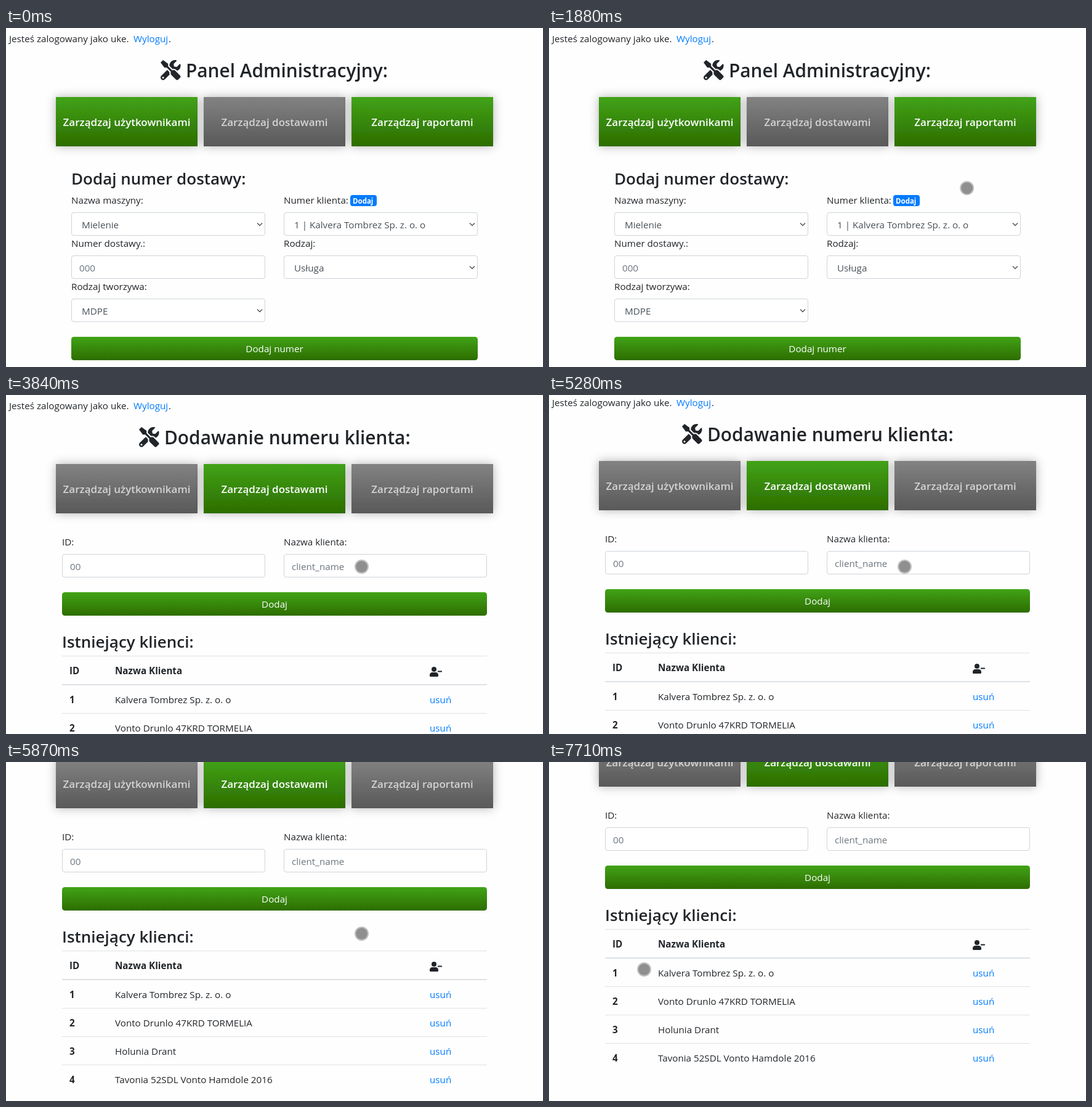
An HTML page that plays this animation: 872 px wide and 550 px high, repeating every 8 s.

```html
<!DOCTYPE html>
<html lang="pl">
<head>
<meta charset="utf-8">
<title>Panel</title>
<style>
  html, body { margin: 0; width: 100%; height: 100%; overflow: hidden; background: #fefefe; }
  svg { display: block; width: 100%; height: 100%; }
  text { font-family: "Open Sans", "Noto Sans", sans-serif; font-size: 15.2px; fill: #212529; }
  .h1 { font-size: 29.8px; font-weight: 600; }
  .h2 { font-size: 26px; font-weight: 600; }
  .nav { font-size: 17px; font-weight: 600; text-anchor: middle; }
  .mid { text-anchor: middle; }
  .bold { font-weight: 700; }
  .badge { font-size: 11.5px; font-weight: 700; }
  .white { fill: #fff; }
  .pale { fill: #d4d4d4; }
  .value { fill: #495057; }
  .hint { fill: #6c757d; }
  .link { fill: #007bff; }
  .field { fill: #fff; stroke: #ced4da; }
  .chevron { fill: none; stroke: #555; stroke-width: 1.5; }
</style>
</head>
<body>
<svg viewBox="0 0 872 550">
  <defs>
    <linearGradient id="green" x2="0" y2="1"><stop stop-color="#41a317"/><stop offset="1" stop-color="#2d6d00"/></linearGradient>
    <linearGradient id="gray" x2="0" y2="1"><stop stop-color="#828282"/><stop offset="1" stop-color="#595959"/></linearGradient>
    <filter id="shadow" x="-20%" y="-50%" width="140%" height="200%">
      <feDropShadow dx="0" dy="0" stdDeviation="8" flood-opacity=".3"/>
    </filter>
    <path id="tools" fill="#212529" fill-rule="evenodd" d="M501 396L384 279C361 256 326 251 299 265L192 158V96L64 0 0 64l96 128h62l107 107c-14 28-9 62 14 85l117 117c14 15 38 15 53 0l52-52c15-15 15-39 0-53zM332 225c28 0 55 11 75 31l19 19c16-7 31-16 44-29 37-37 50-89 38-137-2-9-14-12-20-5l-75 74-68-11-11-68 74-75c7-6 4-17-5-20-48-11-100 1-137 38-28 29-42 66-41 104l82 82zM228 307l-57-57L19 403c-25 25-25 65 0 90s65 25 90 0l124-123c-8-20-10-42-5-63zM64 472a24 24 0 1 1 0-48 24 24 0 0 1 0 48z"/>
  </defs>
  <g id="deliveries"></g>
  <g id="clients"></g>
  <rect id="scrollbar" x="865" y="4" width="3" height="419" rx="1.5" fill="#808080"/>
  <g id="touch">
    <circle r="9.5" fill="#202020" fill-opacity=".5"/>
    <circle r="10.5" fill="none" stroke="#505050" stroke-opacity=".35" stroke-width="2"/>
  </g>
  <path id="arrow" d="M578.5 279.5v15.5l3.6-3.4 2.4 5.6 2.3-1-2.4-5.5h5z" fill="#fff" stroke="#000"/>
</svg>
<script>
const $ = id => document.getElementById(id);
const text = (x, y, s, cls = '') => `<text x="${x}" y="${y}" class="${cls}">${s}</text>`;
const rect = (x, y, w, h, attrs) => `<rect x="${x}" y="${y}" width="${w}" height="${h}" ${attrs}/>`;
const field = (x, y, w) => rect(x + .5, y + .5, w - 1, 37, 'rx="3.5" class="field"');
const input = (x, y, w, hint) => field(x, y, w) + text(x + 13, y + 26, hint, 'hint');
const chevron = (x, y) => `<path class="chevron" d="M${x - 4} ${y - 2}l4 4 4-4"/>`;
const select = (x, y, value) =>
  field(x, y, 315) + text(x + 17, y + 26, value, 'value') + chevron(x + 306, y + 19.5);
const button = (x, y, w, label) =>
  rect(x, y, w, 38, 'rx="4.5" fill="url(#green)"') + text(436, y + 25, label, 'mid white');
const line = (y, h = 1) => rect(91, y, 690, h, 'fill="#dee2e6"');

function header(title, iconX, activeColor, otherColor) {
  const labels = ['użytkownikami', 'dostawami', 'raportami'];
  const color = i => i === 1 ? activeColor : otherColor;
  const boxes = labels.map((_, i) =>
    rect(81 + 240 * i, 112, 230, 80, `fill="url(#${color(i)})" filter="url(#shadow)"`));
  const names = labels.map((s, i) =>
    text(196 + 240 * i, 159, 'Zarządzaj ' + s, 'nav ' + (color(i) === 'green' ? 'white' : 'pale')));
  return text(5, 23, 'Jesteś zalogowany jako uke.') + text(207, 23, 'Wyloguj', 'link') + text(264, 23, '.') +
    `<use href="#tools" transform="translate(${iconX} 52) scale(.0635)"/>` +
    text(iconX + 41, 80, title, 'h1') + boxes.join('') + names.join('');
}

const firstClient = 'Kalvera Tombrez Sp. z. o. o';
const clients = [firstClient, 'Vonto Drunlo 47KRD TORMELIA', 'Holunia Drant', 'Tavonia 52SDL Vonto Hamdole 2016'];

$('deliveries').innerHTML = header('Panel Administracyjny:', 251, 'gray', 'green') +
  text(106, 254, 'Dodaj numer dostawy:', 'h2') +
  text(106, 285, 'Nazwa maszyny:') + select(106, 299, 'Mielenie') +
  text(451, 285, 'Numer klienta:') + rect(559, 271, 43, 18, 'rx="4" class="link"') +
  text(563, 285, 'Dodaj', 'badge white') + select(451, 299, '1 | ' + firstClient) +
  text(106, 355, 'Numer dostawy.:') + input(106, 369, 315, '000') +
  text(451, 355, 'Rodzaj:') + select(451, 369, 'Usługa') +
  text(106, 425, 'Rodzaj tworzywa:') + select(106, 439, 'MDPE') +
  button(106, 501, 660, 'Dodaj numer') +
  `<g id="hover">${rect(748, 300, 17.5, 36.5, 'fill="#dcdcdc"')}
   <path class="chevron" style="stroke:#111;stroke-width:2" d="M753 316.5l4 4 4-4"/></g>`;

$('clients').innerHTML = header('Dodawanie numeru klienta:', 216, 'green', 'gray') +
  text(91, 244, 'ID:') + input(91, 258, 330, '00') +
  text(451, 244, 'Nazwa klienta:') + input(451, 258, 330, 'client_name') +
  button(91, 320, 690, 'Dodaj') +
  text(91, 410, 'Istniejący klienci:', 'h2') + line(423) +
  text(103, 453, 'ID', 'bold') + text(177, 453, 'Nazwa Klienta', 'bold') +
  `<g transform="translate(688 441)" fill="#212529"><circle cx="7" cy="4" r="4"/>
   <path d="M0 14.5v-1.3a4.2 4.2 0 0 1 4.2-4.2h5.6a4.2 4.2 0 0 1 4.2 4.2v1.3a1.5 1.5 0 0 1-1.5 1.5h-11a1.5 1.5 0 0 1-1.5-1.5z"/>
   <rect x="13" y="6.5" width="7" height="2" rx=".5"/></g>` +
  line(469, 2) +
  clients.map((name, i) => {
    const y = 500 + 46 * i;
    return text(103, y, i + 1, 'bold') + text(177, y, name) + text(688, y, 'usuń', 'link') +
      (i < 3 ? line(y + 16) : '');
  }).join('');

// Pointer path: time, x, y
const path = [
  [610, 829, 565], [750, 831, 505], [900, 824, 425], [1050, 811, 362], [1200, 799.5, 320.5],
  [1430, 791, 297], [1460, 790, 295], [1600, 762, 277], [1750, 722, 264], [1900, 672, 259],
  [2050, 625, 262], [2150, 600, 267], [2250, 581, 275], [2400, 577.5, 278.5],
  [6310, 577.5, 278.5], [6450, 547, 282], [6600, 475, 303], [6800, 362, 360],
  [6950, 295, 394], [7130, 242, 416], [7250, 222, 420], [7400, 195, 403],
  [7550, 168, 365], [7710, 154.5, 336.5]
];

function pointerAt(t) {
  const next = path.findIndex(p => p[0] > t);
  if (next < 1) return (next ? path[path.length - 1] : path[0]).slice(1);
  const [a, b] = [path[next - 1], path[next]];
  const u = (t - a[0]) / (b[0] - a[0]);
  return [a[1] + (b[1] - a[1]) * u, a[2] + (b[2] - a[2]) * u];
}

const clamp = u => Math.min(1, Math.max(0, u));
// One wheel notch: 100 px, easing out
const notch = (t, start) => 100 * (1 - (1 - clamp((t - start) / 337)) ** 2.5);
const show = (id, on) => $(id).setAttribute('visibility', on ? 'visible' : 'hidden');

function render(t) {
  const onClients = t >= 3330;
  const clicking = t >= 2700 && !onClients;
  $('deliveries').style.display = onClients ? 'none' : '';
  $('clients').style.display = onClients ? '' : 'none';
  show('hover', clicking);
  show('arrow', clicking);
  show('touch', !clicking);
  $('touch').setAttribute('transform', `translate(${pointerAt(t)})`);
  $('scrollbar').setAttribute('opacity', onClients ? .5 * clamp((3840 - t) / 90) : 0);
  const scroll = Math.round(Math.min(152, notch(t, 5273) + notch(t, 5846)));
  $('clients').setAttribute('transform', `translate(0 ${-scroll})`);
}

const start = performance.now();
// The picture advances in 10 ms steps
function tick() {
  const elapsed = performance.now() - start;
  render(Math.floor((elapsed + 3) / 10) * 10 % 8000);
  requestAnimationFrame(tick);
}
tick();
</script>
</body>
</html>
```
